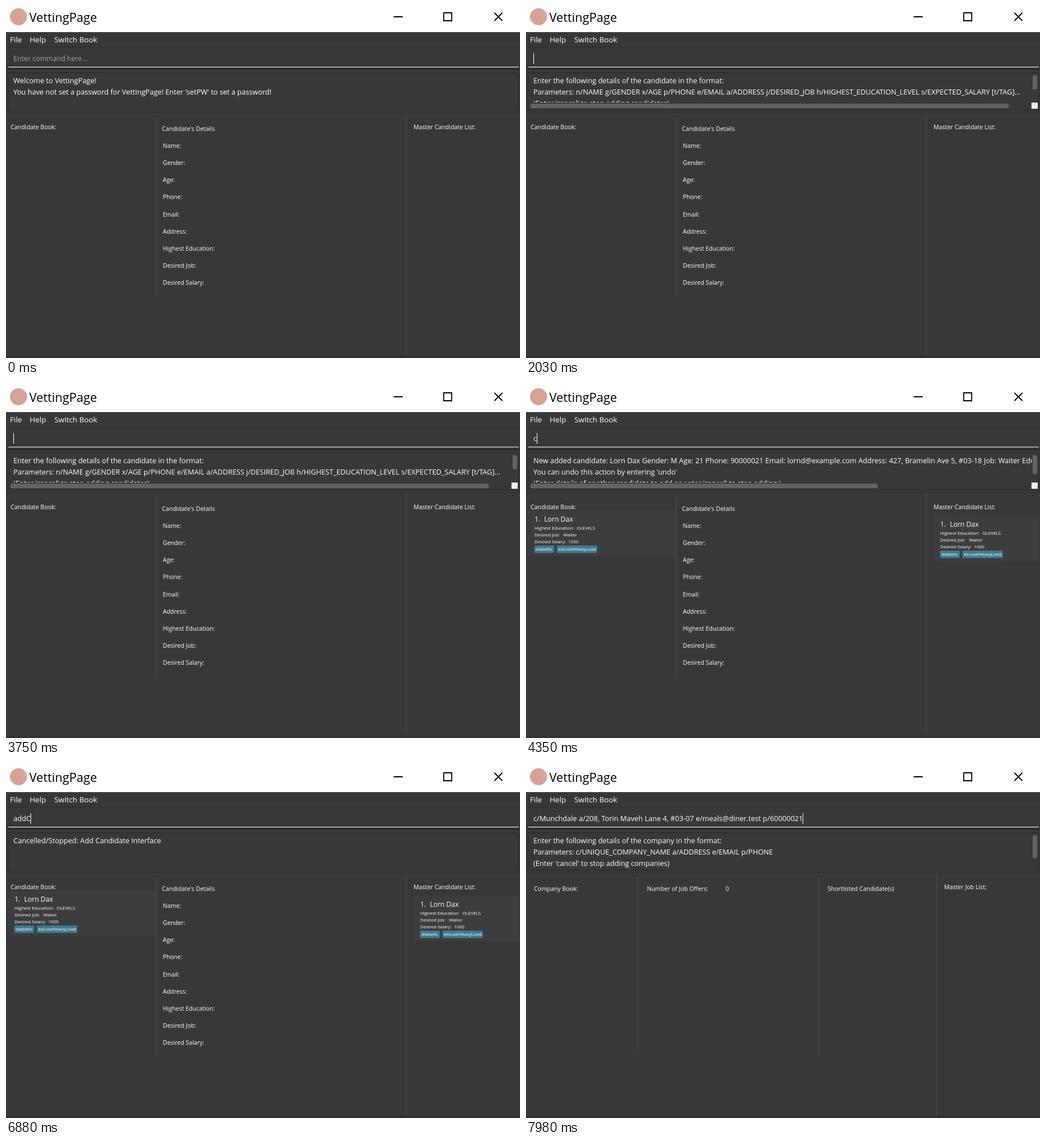
Animation of 903 by 620 pixels, one loop 8 s. Source, as an HTML page:

```html
<!DOCTYPE html>
<html lang="en">
<head>
<meta charset="utf-8">
<title>VettingPage</title>
<style>
  html, body { margin: 0; width: 100%; height: 100%; overflow: hidden; background: #383838; }
  svg { display: block; }
  text { font-family: "Open Sans", "Noto Sans", sans-serif; fill: #fff; white-space: pre; }
</style>
</head>
<body>
<svg id="stage" width="903" height="620" viewBox="0 0 903 620"></svg>
<script>
const text = (x, y, size, str, fill = '#fff') =>
  `<text x="${x}" y="${y}" font-size="${size}" style="fill:${fill}">${str}</text>`;
const rect = (x, y, w, h, fill, extra = '') =>
  `<rect x="${x}" y="${y}" width="${w}" height="${h}" fill="${fill}" ${extra}/>`;
const group = (id, body) => `<g id="${id}">${body}</g>`;
const label = (x, y, str) => text(x, y, 10.5, str);
const divider = (x, y, bottom) => rect(x, y, 1, bottom - y, '#4b4b4b');
const thumb = (x, y, w, h) => rect(x, y, w, h, '#626262', 'rx="2"');
const message = lines => lines.map((s, i) => text(13, 136.3 + i * 19.7, 12.6, s)).join('');

const person = 'Lorn Dax';
const details = 'p/90000021 e/lornd@example.com a/427, Bramelin Ave 5, #03-18';
const candidate = `n/${person} g/M x/21 ${details} j/Waiter h/OLEVELS s/1000 t/diabetic t/excuseHeavyLoad`;
const company = 'c/Munchdale a/208, Torin Maveh Lane 4, #03-07 e/meals@diner.test p/60000021';

const chrome = rect(0, 0, 903, 46, '#fff') +
  '<circle cx="22" cy="19" r="15" fill="#d9a196"/>' +
  text(41, 27.7, 21.5, 'VettingPage', '#000') +
  rect(681, 18, 16, 2, '#000') +
  '<path d="M769 12h14v14h-14zM858 12l14 14m0-14l-14 14" fill="none" stroke="#000" stroke-width="1.8"/>' +
  text(7, 64.3, 13.3, 'File') + text(41.5, 64.3, 13.3, 'Help') + text(85, 64.3, 13.3, 'Switch Book') +
  rect(0, 72, 903, 1, '#2e2e2e') + rect(4, 107, 897, 1, '#fff') +
  rect(0, 111, 903, 2, '#2c2c2c') +
  rect(3.5, 117.5, 897, 66, 'none', 'stroke="#2b2b2b"') +
  rect(0, 187, 903, 1, '#2e2e2e');

function card(x, y, w, dx) {
  const line = (ly, name, value, vx) =>
    text(dx, y + ly, 7.95, name) + text(dx + vx, y + ly, 7.95, value);
  const tag = (tx, tw, str) =>
    rect(dx + tx, y + 61, tw, 13, '#3e7b91', 'rx="2"') + text(dx + tx + 2.5, y + 70, 8, str);
  return rect(x, y, w, 79, '#3c3d3f') +
    text(dx, y + 19, 12, '1.') + text(dx + 17, y + 19, 12, person) +
    line(33, 'Highest Education:', 'OLEVELS', 74) +
    line(45, 'Desired Job:', 'Waiter', 50.5) +
    line(57, 'Desired Salary:', '1000', 59.5) +
    tag(-0.5, 35, 'diabetic') + tag(39, 71, 'excuseHeavyLoad');
}

const fields = ['Name', 'Gender', 'Age', 'Phone', 'Email', 'Address',
  'Highest Education', 'Desired Job', 'Desired Salary'];
const candidateView = label(8, 216.6, 'Candidate Book:') +
  label(274, 219.7, "Candidate's Details") +
  fields.map((s, i) => label(275.5, 249.8 + i * 30.2, s + ':')).join('') +
  label(716, 216.6, 'Master Candidate List:') +
  divider(264, 196, 511) + divider(703, 188, 620);
const companyView = label(14, 219.7, 'Company Book:') +
  label(212.5, 219.7, 'Number of Job Offers:') + label(350.5, 219.7, '0') +
  label(530, 219.7, 'Shortlisted Candidate(s)') + label(734.5, 216.6, 'Master Job List:') +
  divider(196, 196, 509) + divider(514, 196, 509) + divider(721, 188, 620);

const scrolled = (lines, width, height) =>
  `<g clip-path="url(#short)">${message(lines)}</g>` +
  thumb(8, 172, width, 8) + thumb(890, 122, 8, height) + rect(888, 170, 11, 11, '#eee');

const messages = {
  welcome: message(['Welcome to VettingPage!',
    "You have not set a password for VettingPage! Enter 'setPW' to set a password!"]),
  askPerson: scrolled(['Enter the following details of the candidate in the format:',
    'Parameters: n/NAME g/GENDER x/AGE p/PHONE e/EMAIL a/ADDRESS j/DESIRED_JOB ' +
      'h/HIGHEST_EDUCATION_LEVEL s/EXPECTED_SALARY [t/TAG]...',
    "(Enter 'cancel' to stop adding candidates)"], 840, 25),
  added: scrolled([`New added candidate: ${person} Gender: M Age: 21 Phone: 90000021 ` +
      'Email: lornd@example.com Address: 427, Bramelin Ave 5, #03-18 Job: Waiter Education: OLEVELS',
    "You can undo this action by entering 'undo'",
    "(Enter details of another candidate to add or enter 'cancel' to stop adding.)"], 610, 33),
  stopped: message(['Cancelled/Stopped: Add Candidate Interface']),
  askCompany: message(['Enter the following details of the company in the format:',
    'Parameters: c/UNIQUE_COMPANY_NAME a/ADDRESS e/EMAIL p/PHONE',
    "(Enter 'cancel' to stop adding companies)"]) + thumb(890, 122, 8, 40)
};

const $ = id => document.getElementById(id);
$('stage').innerHTML =
  '<clipPath id="short"><rect x="4" y="118" width="884" height="52"/></clipPath>' +
  chrome + group('people', candidateView) +
  group('cards', card(4, 220, 260, 15) + card(716, 229, 186, 727.7)) +
  group('firms', companyView) + rect(0, 616, 903, 4, '#323232') +
  Object.entries(messages).map(([id, body]) => group(id, body)).join('') +
  group('prompt', text(13, 97, 12.2, 'Enter command here...', '#a6a6a6')) +
  '<text id="input" x="13" y="97" font-size="12.65"></text>' +
  '<rect id="caret" y="83" width="1" height="19" fill="#fff"/>';

// [start ms, typed text, caret visible]
const typing = [
  [0, '', 0], [780, '', 1], [1060, 'a', 1], [1180, 'ad', 1], [1290, 'add', 1], [1470, 'addc', 1],
  [1980, '', 1], [2440, '', 0], [2640, candidate, 1], [3100, candidate, 0],
  [3750, '', 1], [4070, '', 0], [4350, 'c', 1], [4380, 'ca', 1], [4530, 'can', 1],
  [4620, 'canc', 1], [4770, 'cance', 1], [4900, 'cancel', 1],
  [5380, '', 1], [5920, '', 0], [6020, '', 1], [6420, 'a', 1], [6510, 'ad', 1],
  [6600, 'add', 1], [6880, 'addC', 1], [7340, '', 1], [7800, '', 0], [7980, company, 1]
];
const replies = [[0, 'welcome'], [2030, 'askPerson'], [3800, 'added'], [5410, 'stopped'], [7390, 'askCompany']];
const at = (steps, t) => steps.findLast(s => s[0] <= t);
const show = (id, on) => { $(id).style.display = on ? '' : 'none'; };

function draw(now) {
  const t = now % 8000;
  const [, typed, caret] = at(typing, t);
  const reply = at(replies, t)[1];
  const input = $('input');
  if (input.textContent !== typed) input.textContent = typed;
  $('caret').setAttribute('x', Math.round(12.5 + (typed ? input.getComputedTextLength() : 0)));
  show('caret', caret);
  show('prompt', t < 680);
  for (const id in messages) show(id, id === reply);
  show('people', t < 7390);
  show('cards', t >= 3800 && t < 7390);
  show('firms', t >= 7390);
}

const start = performance.now();
function tick() {
  draw(performance.now() - start);
  requestAnimationFrame(tick);
}
tick();
</script>
</body>
</html>
```
